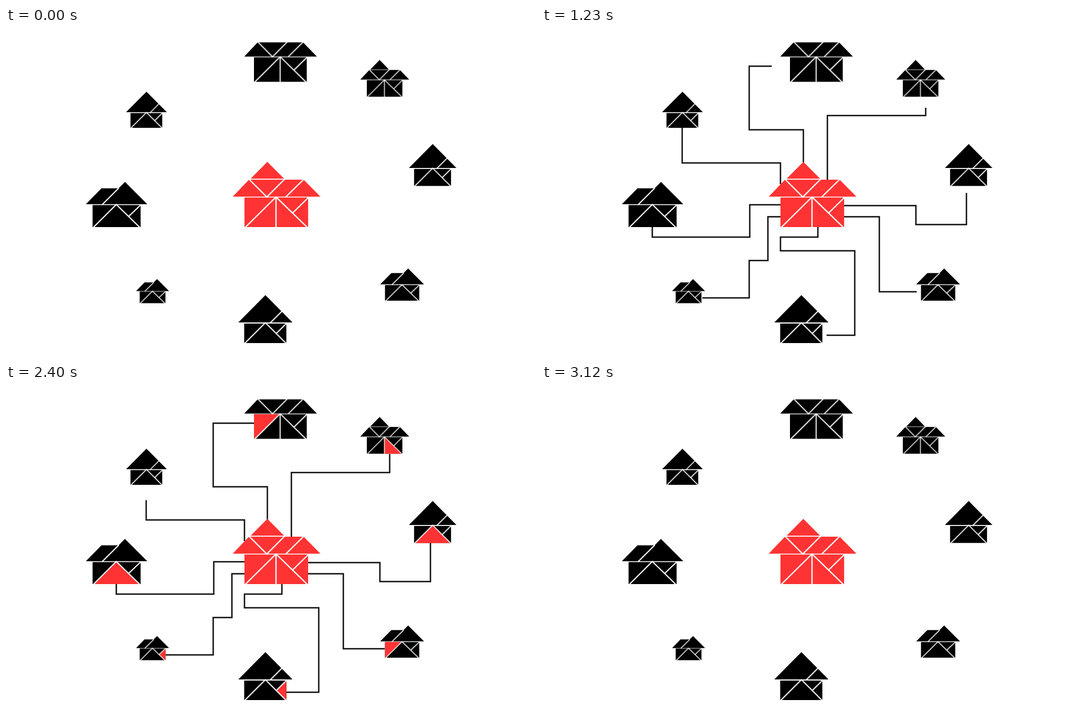
An HTML page without scripts that plays this animation: 949x590 px, repeating every 3300 ms.

```html
<!DOCTYPE html>
<html lang="en">
<head>
<meta charset="utf-8">
<title>Connected houses</title>
<style>
  html, body { margin: 0; width: 100%; height: 100%; overflow: hidden; background: #fff; }
  svg { display: block; }

  .wire, .patch {
    animation: 3300ms linear calc(80ms + var(--i) * 77ms) infinite both;
  }
  .wire {
    fill: none;
    stroke: #111;
    stroke-width: 2.5;
    stroke-dasharray: 1 2;
    animation-name: wire;
  }
  .patch { fill: #f33; animation-name: patch; }
  .cuts { fill: none; stroke: #fff; }

  /* draw out, hold, pull back */
  @keyframes wire {
    0% {
      stroke-dashoffset: 1;
      animation-timing-function: cubic-bezier(.23, 0, .08, 1);
      animation-timing-function: linear(0, .012 4%, .067 9.35%, .272 16.5%, .5 23.6%, .646 30.7%,
        .741 37.9%, .815 45%, .875 52%, .922 59.3%, .941 63.7%, .96 70.8%, .974 78%, .983 85%, .996 92%, 1);
    }
    32.73%, 69.85% { stroke-dashoffset: 0; }
    74.73%, 100% { stroke-dashoffset: 1; }
  }
  @keyframes patch {
    0%, 37.33% { opacity: 0; }
    38.24%, 69.85% { opacity: 1; }
    69.86%, 100% { opacity: 0; }
  }
</style>
</head>
<body>
<svg width="949" height="590" viewBox="0 0 949 590">
  <defs>
    <!-- single gable -->
    <path id="gable" d="M0 0L48.5 49H-48.5ZM-38 51H37.5V86H-38Z"/>
    <path id="gable-cuts" class="cuts" d="M30.5 28L8 50.5M-37.5 87L0 49.5L37.5 87M38.5 50L19.3 69"/>

    <!-- gable with a side roof -->
    <path id="annex" d="M0 0L40 40H-70L-42 11.5H-11.5ZM-58 41.5H28V81H-58Z"/>
    <path id="annex-cuts" class="cuts" d="M-11 11L-41 41M-57 82L-15.5 40.5L27 82M28.5 41L6.5 62"/>

    <!-- wide hall, optionally with a turret -->
    <path id="hall" d="M-33 32H65L95 62.5H-62ZM-41 64H73V117H-41Z"/>
    <path id="hall-cuts" class="cuts" d="M-33 31L-1 63L31 31M65.5 31L33 63M-40 118L15.5 63L72 118M15.5 63V118M73.5 64L45 92"/>
    <path id="turret" d="M0 0L30 30.3H-30Z"/>
  </defs>

  <g>
    <path class="wire" style="--i:0" pathLength="1" d="M427 280V242H251V179"/>
    <path class="wire" style="--i:1" pathLength="1" d="M427 317H372V375H197.500V357"/>
    <path class="wire" style="--i:2" pathLength="1" d="M427 338.500H404.500V417H371V484H286"/>
    <path class="wire" style="--i:3" pathLength="1" d="M494 357V375H427V399.500H560V551H502"/>
    <path class="wire" style="--i:4" pathLength="1" d="M541 338.500H604V473H678"/>
    <path class="wire" style="--i:5" pathLength="1" d="M541 318.500H669.500V352.500H760V283"/>
    <path class="wire" style="--i:6" pathLength="1" d="M511 272V157H687V124"/>
    <path class="wire" style="--i:7" pathLength="1" d="M468 241V182.500H371V68.500H444"/>
  </g>

  <g transform="translate(468 240)" fill="#f33" stroke-width="2.3">
    <use href="#turret"/><use href="#hall"/><use href="#hall-cuts"/>
  </g>

  <g style="--i:0" transform="translate(251.5 114.200) scale(.7526)" stroke-width="2.1">
    <use href="#gable"/><path class="patch" d="M-36.500 86L0 49.500L36.500 86Z"/><use href="#gable-cuts"/>
  </g>
  <g style="--i:1" transform="translate(213 276)" stroke-width="2">
    <use href="#annex"/><path class="patch" d="M-56 81L-15.500 40.500L26 81Z"/><use href="#annex-cuts"/>
  </g>
  <g style="--i:2" transform="translate(270.5 450.200) scale(.536)" stroke-width="2.6">
    <use href="#annex"/><path class="patch" d="M6.500 62L28 41.500V81H26Z"/><use href="#annex-cuts"/>
  </g>
  <g style="--i:3" transform="translate(464.5 479)" stroke-width="2">
    <use href="#gable"/><path class="patch" d="M19.300 69L37.500 51V86H36.500Z"/><use href="#gable-cuts"/>
  </g>
  <g style="--i:4" transform="translate(720 431.300) scale(.7136)" stroke-width="2.3">
    <use href="#annex"/><path class="patch" d="M-58 41.500H-16.500L-56 81H-58Z"/><use href="#annex-cuts"/>
  </g>
  <g style="--i:5" transform="translate(764 208) scale(.876)" stroke-width="2.1">
    <use href="#gable"/><path class="patch" d="M-36.500 86L0 49.500L36.500 86Z"/><use href="#gable-cuts"/>
  </g>
  <g style="--i:6" transform="translate(669 57.300) scale(.558 .564)" stroke-width="2.6">
    <use href="#turret"/><use href="#hall"/><path class="patch" d="M15.500 64V117H71Z"/><use href="#hall-cuts"/>
  </g>
  <g style="--i:7" transform="translate(478 -1) scale(.829 .834)" stroke-width="2.3">
    <use href="#hall"/><path class="patch" d="M-41 64H14.500L-39 117H-41Z"/><use href="#hall-cuts"/>
  </g>
</svg>
</body>
</html>
```
